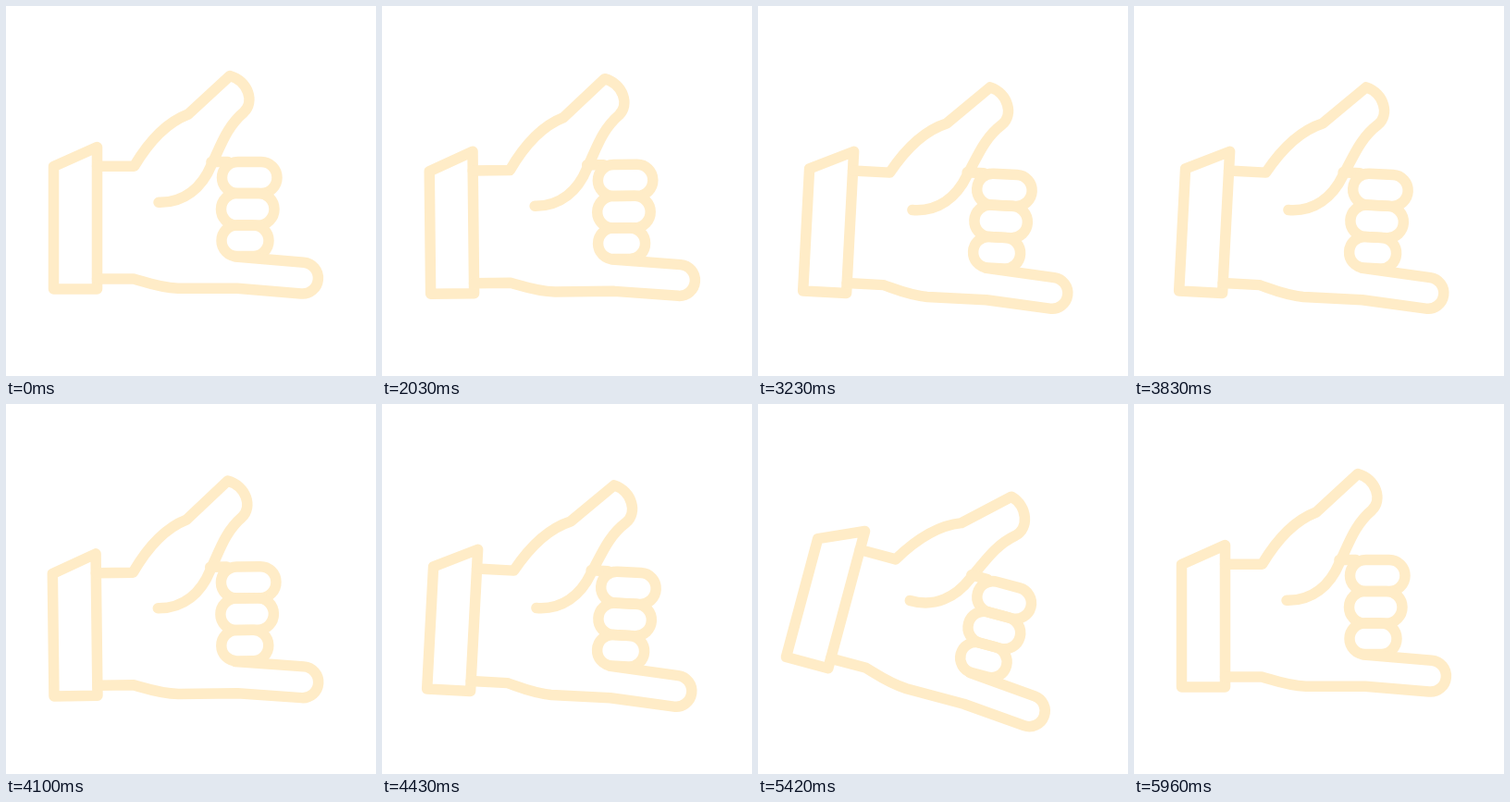
An HTML page that plays this animation: 400x400 px, repeating every 5990 ms.

```html
<!DOCTYPE html>
<html lang="en">
<head>
<meta charset="utf-8">
<title>Shaka hand</title>
<style>
  html, body { margin: 0; width: 100%; height: 100%; overflow: hidden; background: #fff; }
  svg { display: block; width: 100vw; height: 100vh; }
  #hand { fill: none; stroke: #ffecc7; stroke-width: 11.5; stroke-linecap: round; stroke-linejoin: round; }
</style>
</head>
<body>
<svg viewBox="0 0 400 400">
  <g id="hand">
    <path d="M51.5 173.5 98.5 152.5V306H51.5Z"/>
    <path d="M98.5 173.3H138.5C153 149 173 126 197 117L242 75.5C262 81 269 104 257 115C238 131 232 152 222 172C212 196 193 213 165 212.3"/>
    <path d="M222 168.5H240"/>
    <rect x="233.5" y="168.5" width="59.5" height="34" rx="17"/>
    <rect x="232.5" y="202.5" width="57.5" height="34.5" rx="17.2"/>
    <rect x="233" y="237" width="51" height="33.5" rx="16.7"/>
    <path d="M248 271 322 277.3A16.8 16.8 0 0 1 319 311L250 305.3H186C166 304.5 152 299 138 295H98.5"/>
  </g>
</svg>
<script>
  const LOOP = 5990, STEP = 30, START = 2030, SWING = 600;
  const hand = document.getElementById('hand');

  // Each key: time, then the values to ease between.
  const turn = [[2000, 0], [2180, -9], [2480, 15]];
  const shift = [[2000, 0, 0], [2030, 0, 3.6], [2180, -2.5, 7], [2480, 1.3, 5], [2630, 2.5, 10]];

  for (let t = 2630; t < 5030; t += SWING) {
    turn.push([t + 150, -9], [t + 450, 15]);
    shift.push([t + 150, -2, 7.3], [t + 450, 1.3, 9.6], [t + 600, 2.5, 10]);
  }
  turn.push([5180, -9], [5420, 15], [5580, -2], [5750, 3], [5950, 0]);
  shift.push([5180, -2, 7.3], [5420, 1.3, 9.6], [5570, 0, -19], [5750, 0, 0]);

  function at(keys, t) {
    const i = keys.findIndex(k => k[0] > t);
    if (i === 0) return keys[0].slice(1);
    if (i < 0) return keys[keys.length - 1].slice(1);
    const a = keys[i - 1], b = keys[i];
    const p = (1 - Math.cos(Math.PI * (t - a[0]) / (b[0] - a[0]))) / 2;
    return a.slice(1).map((v, n) => v + (b[n + 1] - v) * p);
  }

  function draw(now) {
    const t = START + Math.floor((now % LOOP - START) / STEP) * STEP;
    const [angle] = at(turn, t), [x, y] = at(shift, t);
    hand.setAttribute('transform', `translate(${x} ${y}) rotate(${angle} 200 200)`);
    requestAnimationFrame(tick);
  }

  const begin = performance.now();
  const tick = () => draw(performance.now() - begin);
  draw(0);
</script>
</body>
</html>
```
